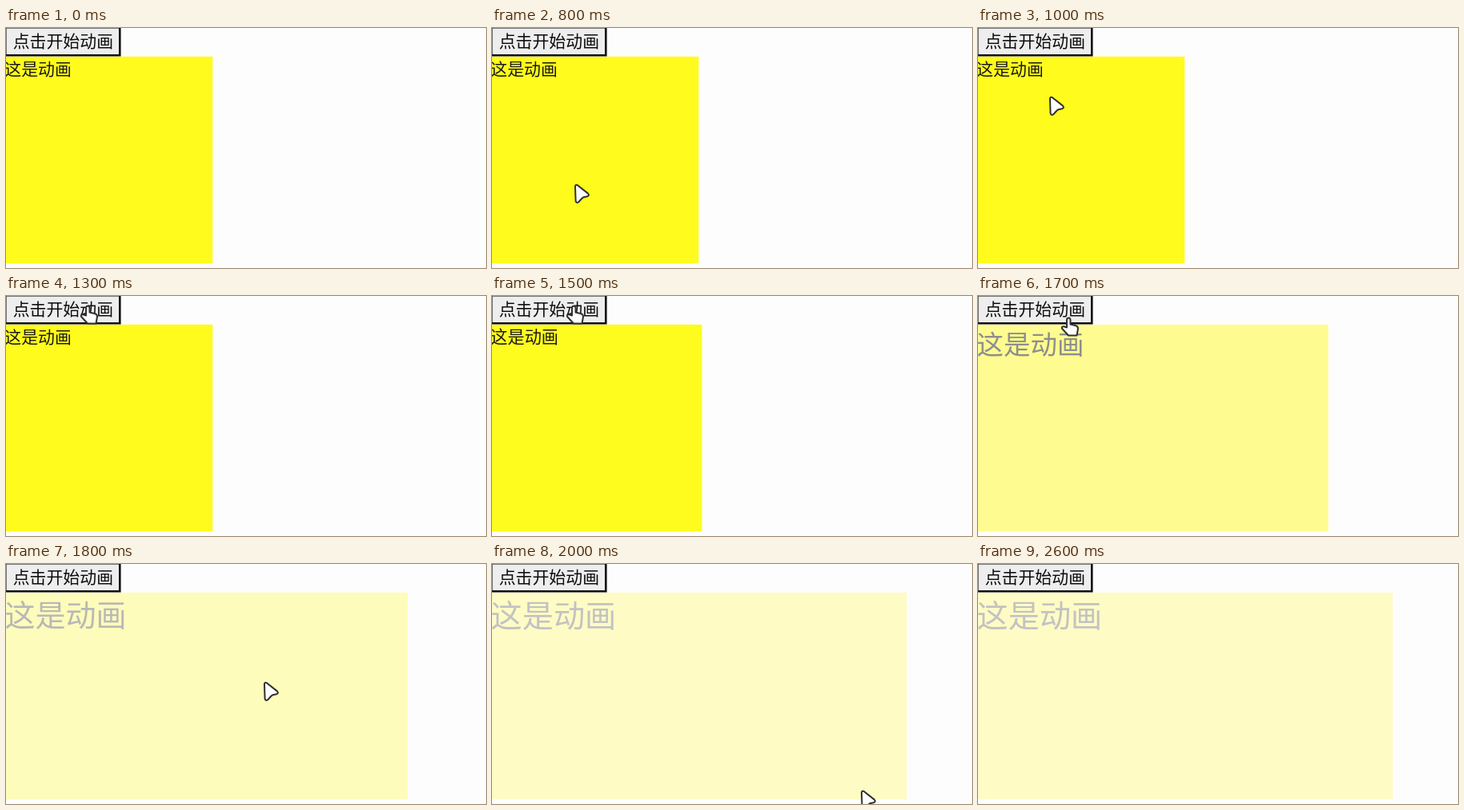
Write an HTML page without scripts that moves like this. It is 600 px wide and 301 px high and loops after 2700 ms.

```html
<!DOCTYPE html>
<html lang="zh-CN">
<head>
<meta charset="utf-8">
<title>动画</title>
<style>
@property --p { syntax: '<number>'; inherits: true; initial-value: 0; }
html, body { margin: 0; width: 100%; height: 100%; overflow: hidden; background: #fefdfe; }
svg { display: block; width: 600px; height: 301px; }
text { font: 350 20.9px "Noto Sans CJK SC", "Noto Sans CJK", "Noto Sans CJK JP", sans-serif; fill: #0c0c0c; }

/* --p is the eased progress of the box, sampled every 100 ms */
.box { opacity: calc(1 - .75 * var(--p)); animation: grow 2.7s step-end infinite; }
.box rect, .box text { transform-origin: -2px 36px; }
.box rect { fill: #fffb1c; transform: scaleX(calc(1 + var(--p))); }
.box text { fill: #181818; transform: scale(calc(1 + .875 * var(--p))); }
@keyframes grow {
  0% { --p: 0; }
  55.55% { --p: .016; }
  59.25% { --p: .254; }
  62.96% { --p: .69; }
  66.66% { --p: .937; }
  70.37%, 100% { --p: 1; }
}

/* bevel swaps its two tones while the button is held down */
.lit { --up: #555; --down: #111; }
.dark { --up: #111; --down: #555; }
.lit, .dark { fill: none; stroke-width: 2.6px; animation: press 2.7s step-end infinite; }
@keyframes press {
  0%, 55.55%, 100% { stroke: var(--up); }
  51.85% { stroke: var(--down); }
}

.cursor { fill: #fff; stroke: #303030; stroke-width: 2px; stroke-linejoin: round; animation: move 2.7s step-end infinite; }
.arrow { animation: arrow 2.7s step-end infinite; }
.hand { animation: hand 2.7s step-end infinite; }
@keyframes move {
  0% { transform: translate(102px, 195px); }
  33.33% { transform: translate(96px, 140px); }
  37.03% { transform: translate(88px, 85px); }
  40.74% { transform: translate(82px, 45px); }
  44.44% { transform: translate(87px, 17px); }
  48.14% { transform: translate(92px, 11px); }
  62.96% { transform: translate(103px, 26px); }
  66.66% { transform: translate(321px, 147px); }
  70.37% { transform: translate(467px, 225px); }
  74.07%, 100% { transform: translate(460px, 283px); }
}
@keyframes arrow {
  0%, 44.44%, 77.77%, 100% { opacity: 0; }
  29.62%, 66.66% { opacity: 1; }
}
@keyframes hand {
  0%, 66.66%, 100% { opacity: 0; }
  44.44% { opacity: 1; }
}
</style>
</head>
<body>
<svg viewBox="0 0 600 301">
  <g class="box">
    <rect x="-2" y="35.8" width="260.3" height="259.5"/>
    <text x="-1.7" y="59">这是动画</text>
  </g>
  <g>
    <rect x="-2" y="-2" width="145.6" height="37.6" fill="#eee"/>
    <path class="lit" d="M-.5 35V-.5H143"/>
    <path class="dark" d="M-2 34.3H142.3V-2"/>
    <text x="8.7" y="24.4">点击开始动画</text>
  </g>
  <g class="cursor">
    <path class="arrow" d="M2 3.8Q2.2 .6 5 2.2L17.8 12.4Q20.4 15.2 17 16.2L12.5 17.3Q11.3 17.7 10.4 18.8L6.5 23Q3.4 25.4 2.6 21.8Z"/>
    <path class="hand" d="M8 13.5V4Q8 1.5 10.2 1.5T12.5 4V9.5L19.5 11.2Q22 12 22 15L20.5 23.5H10L2 14.8Q1.3 12 4.5 12.2Z"/>
  </g>
</svg>
</body>
</html>
```
